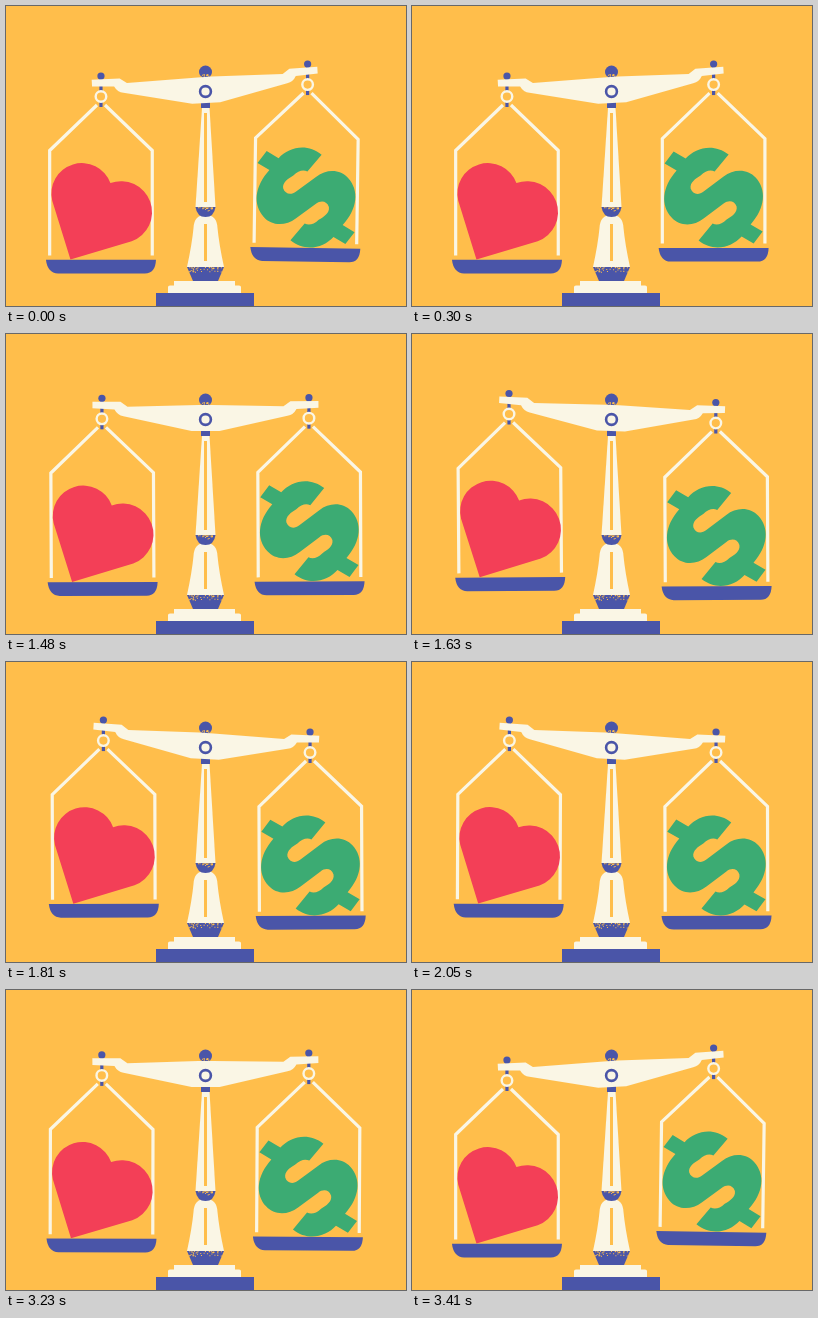
An HTML page for the animation above (3.44 s loop, 400 by 300 pixels).

```html
<!DOCTYPE html>
<html lang="en">
<head>
<meta charset="utf-8">
<title>Love and money on a scale</title>
<style>
  html, body { margin: 0; width: 100%; height: 100%; overflow: hidden; background: #ffbe4b; }
  svg { display: block; width: 100%; height: 100%; }
  .bg { fill: #ffbe4b; }
  .blue { fill: #4a55a8; }
  .white { fill: #faf6e5; }
  .line { fill: none; stroke: #faf6e5; stroke-width: 3.2; }
</style>
</head>
<body>
<svg viewBox="0 0 400 300">
  <defs>
    <g id="hanger">
      <path class="line" d="M-4 8.500L-51.300 54V159M4 8.500L51.300 54V159"/>
      <path class="blue" d="M-55 163.300H55Q54.500 177 44 177H-43Q-53.500 176.500 -55 163.300Z"/>
    </g>
    <g id="stem">
      <path class="blue" d="M-1.600 -20H1.600V10.500H-1.600Z"/>
      <circle class="blue" cy="-20.500" r="3.600"/>
    </g>
    <circle id="ring" class="bg" r="5.300" stroke="#faf6e5" stroke-width="2.400"/>
  </defs>

  <rect class="bg" width="400" height="300"/>

  <g id="post">
    <path class="blue" d="M150 287H248V300H150Z"/>
    <path class="white" d="M162 287V281Q162 279.500 164 279.500H168V275H229V279.500H233Q235 279.500 235 281V287Z"/>
    <path class="blue" d="M181 261H218L212 275H187Z"/>
    <path class="white" d="M181 261Q186 238 187.500 222Q188 209 199.500 209T211.500 222Q213 238 218 261Z"/>
    <path class="blue" d="M189.500 201H209.500Q208 211 199.500 211T189.500 201Z"/>
    <path class="white" d="M196 102H203.500L209.500 201H189.500Z"/>
    <path class="bg" d="M198 107H201V196H198ZM198 218H201V255H198Z"/>
    <path class="blue" d="M195 96H204V102H195Z"/>
    <circle class="blue" cx="199.500" cy="66" r="6.500"/>
    <path id="grain" class="bg"/>
  </g>

  <g class="arm"><use href="#stem"/></g>
  <g class="arm"><use href="#stem"/></g>

  <path id="beam" class="white" d="M-113 -17.700L-85 -17.500L-78 -12.500L-7 -14H7L78 -12.500L85 -17.500L113 -17.700V-11L91 -9.800Q88 -4 82 -3L14 12H-14L-82 -3Q-88 -4 -91 -9.800L-113 -11Z"/>
  <circle cx="199.500" cy="85.500" r="5.400" fill="#faf6e5" stroke="#4a55a8" stroke-width="2.600"/>

  <g class="arm">
    <g class="swing">
      <use href="#hanger"/>
      <path fill="#f33f57" transform="translate(-30.500 163) scale(1.012) translate(-64.500 -254)" d="M64.500 254L46.500 196A30.100 30.100 0 0 1 104 178.500A30.600 30.600 0 0 1 125 236Z"/>
    </g>
    <use href="#ring"/>
  </g>
  <g class="arm">
    <g class="swing">
      <use href="#hanger"/>
      <path fill="#3cab73" transform="translate(0 113)" d="M15 -43L1 -26C-3 -28 -8 -27 -13 -22C-18 -19 -24 -15 -23 -9C-21 -3 -15 -2 -10 -6L10 -21C20 -29 34 -29 42 -20C53 -8 52 10 37 27L49 34L40 46L28 39C18 50 0 55 -15 43L-1 26C3 28 8 27 13 22C18 19 24 15 23 9C21 3 15 2 10 6L-10 21C-20 29 -34 29 -42 20C-53 8 -52 -10 -37 -27L-49 -34L-40 -46L-28 -39C-18 -50 0 -55 15 -43Z"/>
    </g>
    <use href="#ring"/>
  </g>
</svg>
<script>
const LOOP = 3440, TILT = 3.3, CX = 199.5, CY = 85;
const $ = s => [...document.querySelectorAll(s)];
const beam = $('#beam')[0], arms = $('.arm'), swings = $('.swing');

// Sideways drift of each pan: [time, pixels]
const drift = [
  [[0, 0], [1300, 0], [1630, 1.2], [2050, -0.7], [3050, -0.7], [3410, 0], [LOOP, 0]],
  [[0, -2.3], [30, -2.3], [300, 0], [1300, 0.4], [1630, 0.8], [2050, 0.5], [3050, 0.5], [3410, -2.3], [LOOP, -2.3]]
];

function smooth(t, a, b) {
  const u = Math.min(1, Math.max(0, (t - a) / (b - a)));
  return u * u * (3 - 2 * u);
}

function sample(keys, t) {
  const i = keys.findIndex(k => k[0] > t);
  const [a, v] = keys[i - 1], [b, w] = keys[i];
  return v + (w - v) * smooth(t, a, b);
}

function tilt(t) {
  if (t < 1300) return -TILT;
  const p = t < 3050 ? smooth(t, 1240, 1740) : 1 - smooth(t, 3000, 3420);
  return TILT * (2 * p - 1);
}

// Stippled shading on the blue parts
function stipple() {
  let seed = 7, d = '';
  const rnd = () => (seed = seed * 16807 % 2147483647) / 2147483647;
  const dots = (n, x, y, w, h) => {
    while (n--) d += `M${x + rnd() * w} ${y + rnd() ** 2 * h}h1v1h-1z`;
  };
  dots(16, 195, 68, 8, 3);
  dots(24, 191, 201, 16, 4);
  dots(42, 183, 261, 32, 5);
  $('#grain')[0].setAttribute('d', d);
}

function draw(now) {
  const t = now % LOOP, deg = tilt(t), r = deg * Math.PI / 180;
  beam.setAttribute('transform', `translate(${CX} ${CY}) rotate(${deg})`);
  arms.forEach((arm, i) => {
    const x = i % 2 ? 103.5 : -103.5, y = -21;
    const px = CX + x * Math.cos(r) - y * Math.sin(r);
    const py = CY + x * Math.sin(r) + y * Math.cos(r) + 20.5;
    arm.setAttribute('transform', `translate(${px} ${py})`);
  });
  swings.forEach((s, i) => s.setAttribute('transform', `rotate(${-0.35 * sample(drift[i], t)})`));
}

stipple();
const start = performance.now();
function frame() {
  draw(performance.now() - start);
  requestAnimationFrame(frame);
}
frame();
</script>
</body>
</html>
```
